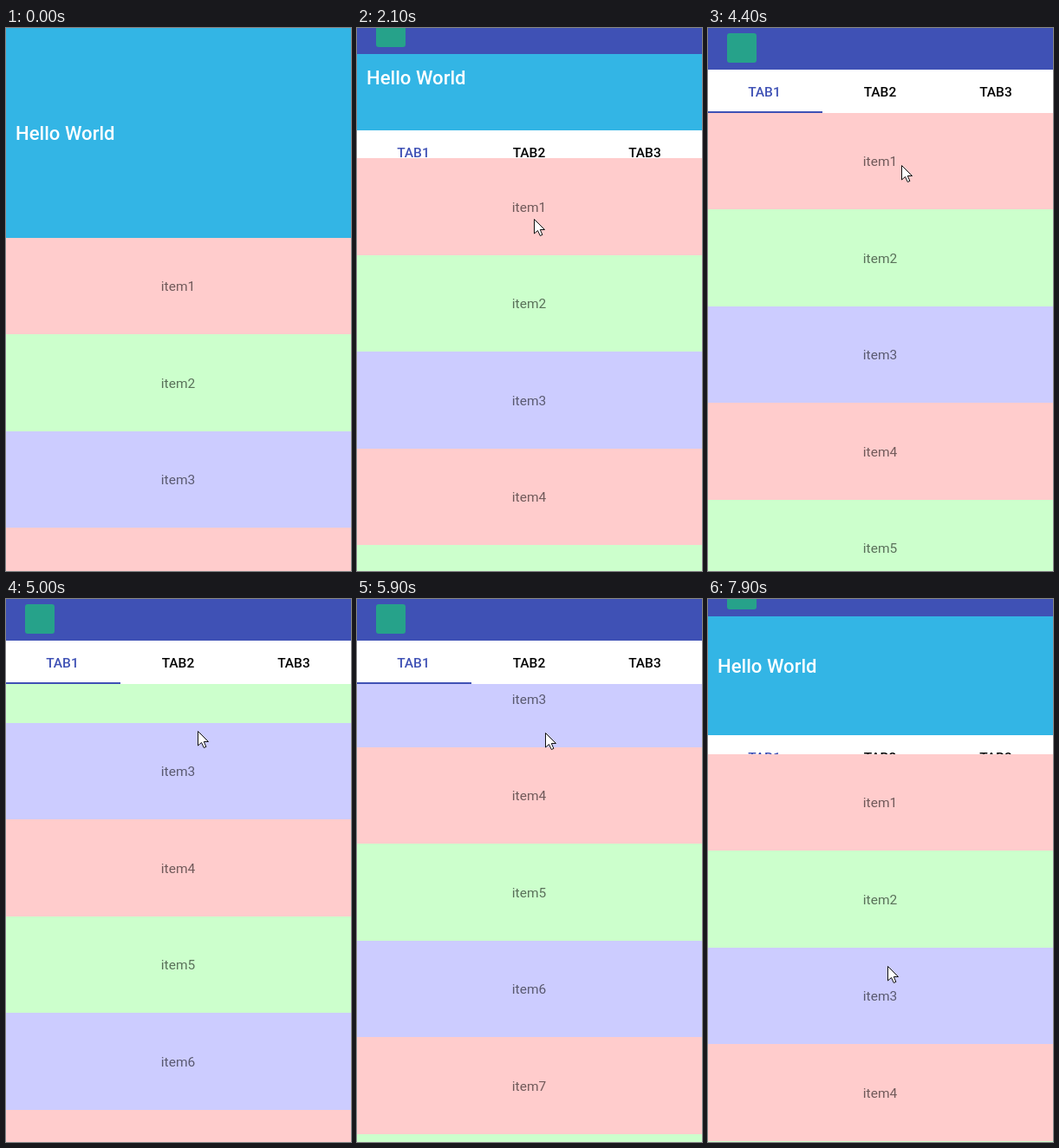
These frames come from a looping animation (398x626 px, 8 s). An HTML page with a canvas:

```html
<!DOCTYPE html>
<html lang="en">
<head>
<meta charset="utf-8">
<title>Collapsing header</title>
<style>
  html, body { margin: 0; width: 100%; height: 100%; overflow: hidden; background: #fff; }
  canvas { display: block; }
</style>
</head>
<body>
<canvas id="stage" width="398" height="626"></canvas>
<script>
const W = 398, H = 626, LOOP = 8000, STEP = 100, ITEM = 111.48;
const ctx = document.getElementById('stage').getContext('2d');
const INDIGO = '#3f51b5';
const ITEM_COLORS = ['#ffcccc', '#ccffcc', '#ccccff'];
const CURSOR = new Path2D('M0 0V16.5L4 13L6.8 19L9.4 17.9L6.8 12H12Z');

// Progress from 0 to 1 between two times: linear and smooth.
const ramp = (t, from, to) => Math.min(1, Math.max(0, (t - from) / (to - from)));
const smooth = u => u * u * (3 - 2 * u);

function rect(color, x, y, w, h) {
  ctx.fillStyle = color;
  ctx.fillRect(x, y, w, h);
}

function text(str, x, y, color, font, align = 'center') {
  ctx.font = font + ' Roboto, sans-serif';
  ctx.textAlign = align;
  ctx.fillStyle = color;
  ctx.fillText(str, x, y);
}

// p: 0 = header fully open, 1 = collapsed to the toolbar
function drawHeader(p) {
  const tabTop = Math.floor(242 - 194 * p);
  const barBottom = Math.round(50 * p - 2);

  rect('#33b5e5', 0, 0, W, tabTop);
  text('Hello World', 11, Math.floor(129 - 100.4 * p), '#fff', '500 22.1px', 'left');

  rect(INDIGO, 0, barBottom - 48, W, 48);
  ctx.fillStyle = '#26a28a';
  ctx.beginPath();
  ctx.roundRect(22, barBottom - 42, 34, 34, 3);
  ctx.fill();

  rect('#fff', 0, tabTop, W, 50);
  for (let i = 0; i < 3; i++) {
    text('TAB' + (i + 1), 65 + 133.5 * i, tabTop + 31, i ? '#000' : INDIGO, '500 15.5px');
  }
  rect(INDIGO, 0, tabTop + 48, 132, 2);
}

function drawList(top, scroll) {
  const clipTop = Math.round(top);
  ctx.save();
  ctx.beginPath();
  ctx.rect(0, clipTop, W, H - clipTop);
  ctx.clip();
  for (let i = Math.floor(scroll / ITEM); ; i++) {
    const y = top + i * ITEM - scroll;
    if (y >= H) break;
    rect(ITEM_COLORS[i % 3], 0, Math.round(y), W, 112);
    text('item' + (i + 1), 198.5, Math.round(y + 61.49), 'rgba(0,0,0,.56)', '400 15.5px');
  }
  ctx.restore();
}

function drawCursor(x, y) {
  ctx.save();
  ctx.translate(Math.round(x) + .5, Math.round(y) + .5);
  ctx.fillStyle = '#fff';
  ctx.fill(CURSOR);
  ctx.strokeStyle = '#111';
  ctx.stroke(CURSOR);
  ctx.restore();
}

function frame(now) {
  const t = Math.floor(now % LOOP / STEP) * STEP;

  const drag = ramp(t, 0, 3486);
  const collapse = .292 * drag + .708 * smooth(drag);
  const expand = ramp(t, 6700, 7900);
  const p = collapse - .5625 * expand;

  const approach = ramp(t, 3500, 4400);
  const swipeUp = smooth(ramp(t, 4500, 5450));
  const swipeDown = smooth(ramp(t, 5650, 6500));

  rect('#fff', 0, 0, W, H);
  drawHeader(p);
  drawList(242 - 144.05 * p, 330.36 * (swipeUp - swipeDown));
  if (t > 0) {
    drawCursor(
      204 + 19 * approach - 3 * swipeUp - 13 * swipeDown,
      457 - 372 * collapse + 73 * approach - 11 * swipeUp + 34 * swipeDown + 242 * expand);
  }
  requestAnimationFrame(frame);
}
requestAnimationFrame(frame);
</script>
</body>
</html>
```
